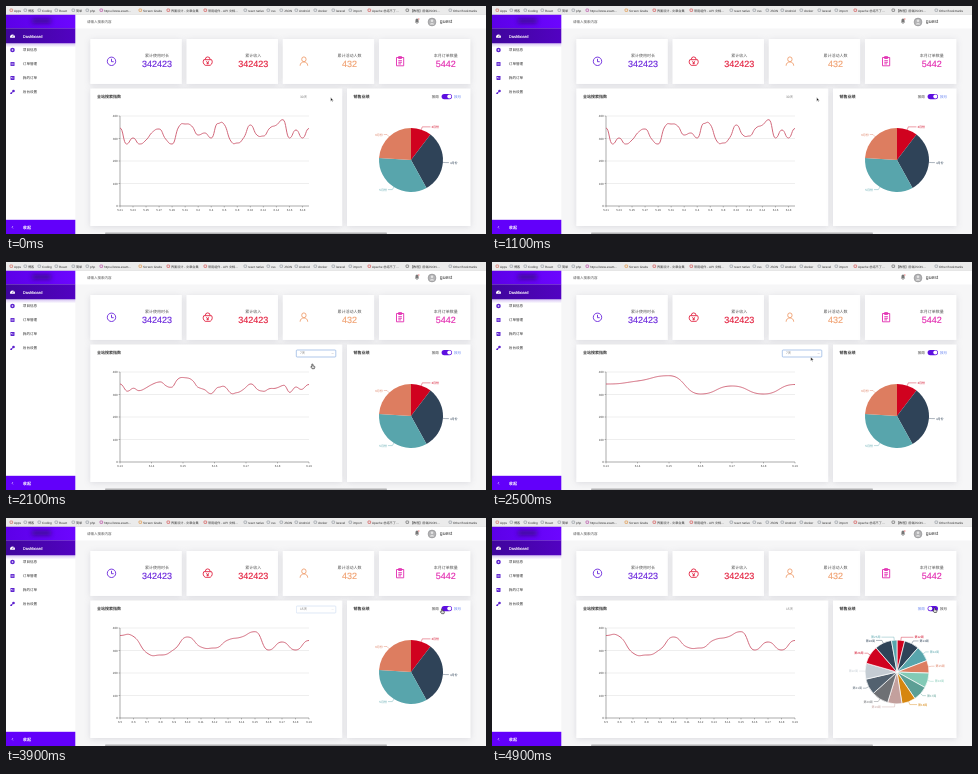
Write an HTML page that moves like this. It is 480 px wide and 228 px high and loops after 5 s.

```html
<!DOCTYPE html>
<html lang="zh">
<head>
<meta charset="utf-8">
<title>Dashboard</title>
<style>
html, body { margin: 0; width: 100%; height: 100%; overflow: hidden; background: #f6f6f7; }
svg { display: block; width: 480px; height: 228px; }
text {
  font-family: "Liberation Sans", "Noto Sans CJK SC", "Noto Sans CJK", sans-serif;
  text-rendering: geometricPrecision;
  white-space: pre;
}
.card { fill: #fff; filter: drop-shadow(0 1px 3px rgba(40, 40, 70, .13)); }
.menu { fill: #fff; stroke: #e2e5ee; stroke-width: .4; filter: drop-shadow(0 1px 1.5px rgba(0, 0, 0, .12)); }
</style>
</head>
<body>
<svg id="stage" viewBox="0 0 480 228" xmlns="http://www.w3.org/2000/svg">
  <defs>
    <linearGradient id="brand"><stop offset="0" stop-color="#5c00e8"/><stop offset="1" stop-color="#6c06ff"/></linearGradient>
    <linearGradient id="active"><stop offset="0" stop-color="#3f069c"/><stop offset="1" stop-color="#5202c2"/></linearGradient>
    <linearGradient id="glow" x2="0" y2="1"><stop offset="0" stop-color="#5a10d0" stop-opacity=".25"/><stop offset="1" stop-color="#5a10d0" stop-opacity="0"/></linearGradient>
    <filter id="soft" x="-.5" y="-1" width="2" height="3"><feGaussianBlur stdDeviation="2"/></filter>
  </defs>
  <g id="base"></g>
  <g id="live"></g>
</svg>
<script>
const LOOP = 5000;
const base = document.getElementById('base');
const live = document.getElementById('live');

// --- small drawing helpers ---
const n = v => +v.toFixed(2);
const rect = (x, y, w, h, fill, extra = '') =>
  `<rect x="${n(x)}" y="${n(y)}" width="${n(w)}" height="${n(h)}" fill="${fill}" ${extra}/>`;
const text = (x, y, s, size, fill, extra = '') =>
  `<text x="${n(x)}" y="${n(y)}" font-size="${size}" fill="${fill}" ${extra}>${s}</text>`;
const line = (d, color, w = .5, extra = '') =>
  `<path d="${d}" fill="none" stroke="${color}" stroke-width="${w}" ${extra}/>`;
const shape = (d, fill, extra = '') => `<path d="${d}" fill="${fill}" ${extra}/>`;
const dot = (x, y, r, fill, extra = '') =>
  `<circle cx="${n(x)}" cy="${n(y)}" r="${r}" fill="${fill}" ${extra}/>`;
const at = (x, y, body) => `<g transform="translate(${n(x)} ${n(y)})">${body}</g>`;
const fade = (opacity, body) => `<g opacity="${n(opacity)}">${body}</g>`;
const MID = 'text-anchor="middle"';
const END = 'text-anchor="end"';
const clamp = v => Math.max(0, Math.min(1, v));
const ease = v => 1 - (1 - clamp(v)) ** 3;
const mix = (a, b, p) => a + (b - a) * p;

// --- static page ---
function bookmarks() {
  const folder = '#8a9099';
  const items = [
    [8, 'Apps', '#d05a4a'], [22, '博客', folder], [36, 'Coding', folder], [53, 'React', folder],
    [70, '简单', folder], [84, 'php', folder], [98, 'https://www.exam…', '#b0389a'],
    [137, 'Screen Grabs', '#e08a30'], [165, '界面设计 - 文章合集', '#d04040'],
    [202, '常用组件 - API 文档…', '#d04040'], [242, 'react native', folder],
    [265, 'css', folder], [278, 'JSON', folder], [293, 'Android', folder],
    [312, 'docker', folder], [330, 'laravel', folder], [347, 'import', folder],
    [366, 'Apache 总结不了…', '#d04040'], [404, '【教程】前端JSON…', '#555'],
    [447, 'Other Bookmarks', folder]
  ];
  return rect(0, 0, 480, 8.4, '#ebebeb') + rect(0, 8, 480, .4, '#cfcfcf') +
    items.map(([x, s, c]) => rect(x - 4, 3, 2.6, 2.4, 'none', `rx=".4" stroke="${c}" stroke-width=".6"`) +
      text(x, 5.5, s, 3.1, '#333')).join('');
}

function sidebar() {
  const purple = '#5d22cf';
  const icons = [
    dot(0, 0, 2.3, purple) + dot(0, 0, .8, '#fff'),
    rect(-2, -2, 4, 4, purple, 'rx=".5"') + line('M-1.2 -.7H1.2M-1.2 .7H1.2', '#fff'),
    rect(-2, -2, 4, 4, purple, 'rx=".4"') + line('M-1 -1V0H1', '#fff', .6),
    line('M-2 2L1 -1', purple, 1) + dot(1, -1, 1.3, purple) + dot(-1.2, 1.2, .9, purple)
  ];
  const labels = ['项目信息', '订单管理', '我的订单', '后台设置'];
  return rect(0, 8.4, 69.3, 219.6, '#fff') +
    rect(0, 8.4, 69.3, 14, 'url(#brand)') +
    rect(26, 12.5, 19, 5, '#340a78', 'filter="url(#soft)" opacity=".75"') +
    rect(0, 22.3, 69.3, 15, 'url(#active)') +
    rect(0, 37.3, 69.3, 4, 'url(#glow)') +
    at(6.5, 30, shape('M-2.4 1.8A2.5 2.5 0 1 1 2.4 1.8Z', '#fff') + line('M0 1L.9 -.8', '#43069f', .6)) +
    text(16.8, 31.5, 'Dashboard', 4, '#fff', 'stroke="#fff" stroke-width=".12"') +
    labels.map((s, i) => at(6.5, 44 + 14 * i, icons[i]) + text(16.8, 45.4 + 14 * i, s, 3.6, '#333')).join('') +
    rect(0, 213.8, 69.3, 14.2, '#6200fa') +
    line('M7 220L6 221.2L7 222.4', '#fff', .5) +
    text(16.8, 222.8, '收起', 4.1, '#fff', 'font-weight="bold"');
}

function header() {
  return rect(69.3, 8.4, 410.7, 14, '#fff') +
    text(81, 16.6, '请输入搜索内容', 3.5, '#555') +
    at(411, 15, shape('M-2.2 1.6L-1.5 .6V-1A1.5 1.5 0 0 1 1.5 -1V.6L2.2 1.6Z', '#777') + dot(0, 2.2, .6, '#777') + dot(1.8, -2, .8, '#e88')) +
    dot(426, 16, 3.9, '#b4b4b6', 'stroke="#8c8c8e" stroke-width=".6"') + dot(426, 14.8, 1.3, '#e4e4e4') +
    shape('M423.6 18.5A2.5 2.2 0 0 1 428.4 18.5Z', '#e4e4e4') +
    text(433.8, 17.4, 'guest', 5.1, '#333');
}

function cards() {
  const data = [
    ['累计使用时长', '342423', '#6a25dc',
      'M-4.2 0A4.2 4.2 0 1 1 4.2 0A4.2 4.2 0 1 1 -4.2 0M0 -2.5V.4H2.2'],
    ['累计收入', '342423', '#e3203f',
      'M-3.9 -1.6H3.9A4 4 0 0 1 2.5 4H-2.5A4 4 0 0 1 -3.9 -1.6M-2.4 -1.8A2.4 2.6 0 0 1 2.4 -1.8M-1.4 0L0 1.2L1.4 0M0 1.2V3M-1.3 1.8H1.3'],
    ['累计活动人数', '432', '#f0a070',
      'M-2.2 -2A2.2 2.4 0 1 1 2.2 -2A2.2 2.4 0 1 1 -2.2 -2M-3.8 4.4C-3.8 -.6 3.8 -.6 3.8 4.4'],
    ['本月订单数量', '5442', '#e22bb0',
      'M-3.6 -3.8H3.6V4.5H-3.6ZM-1.5 -4.7H1.5V-2.8H-1.5ZM-1.8 -.6H1.8M-1.8 1H1.8M-1.8 2.6H1']
  ];
  return data.map(([label, num, c, d], i) => {
    const x = 84.3 + 96.2 * i;
    return rect(x, 33, 91.5, 45, '#fff', 'class="card"') +
      at(x + 21.2, 55.3, line(d, c, .9)) +
      text(x + 66.8, 51.2, label, 4, '#555', MID) +
      text(x + 66.8, 61.2, num, 9, c, MID + ` stroke="${c}" stroke-width=".15"`);
  }).join('');
}

function panels() {
  let s = rect(84.3, 82.5, 252, 137.5, '#fff', 'class="card"') +
    rect(341, 82.5, 123.5, 137.5, '#fff', 'class="card"') +
    text(91, 92.3, '全站搜索指数', 4, '#333', 'font-weight="bold"') +
    text(347.5, 92.3, '销售业绩', 4, '#333', 'font-weight="bold"');
  for (let i = 0; i < 5; i++) {
    const y = 110 + 22.5 * i;
    if (i < 4) s += line(`M114 ${y}H303`, '#ddd', .5);
    s += line(`M112.6 ${y}H114`, '#555', .4) + text(111.8, y + 1, 400 - 100 * i, 3, '#444', END);
  }
  return s + line('M114 110V200H303', '#555', .5) + rect(99, 226.6, 282, 1.4, '#b0b0b2', 'rx=".7"');
}

base.innerHTML = rect(0, 0, 480, 228, '#f6f6f7') + header() + cards() + panels() + sidebar() + bookmarks();

// --- line chart ---
const DAILY = [122, 138, 132, 138, 134, 126, 123, 133, 138, 121, 118, 120, 129, 127, 132,
  117.5, 118.5, 135, 137, 131.5, 119, 129, 130, 122, 119, 113.7, 132, 124, 132, 122.5];
const X0 = 114, SPAN = 189;

function slope(v, i) {
  if (i === 0 || i === v.length - 1) return 0;
  const a = v[i] - v[i - 1], b = v[i + 1] - v[i];
  return a * b <= 0 ? 0 : (a + b) / 2;
}

const bezier = (a, b, c, d, s) => {
  const r = 1 - s;
  return a * r ** 3 + 3 * b * r * r * s + 3 * c * r * s * s + d * s ** 3;
};

// Smooth line whose control points sit half a step from each day.
function curve(days, u) {
  const v = DAILY.slice(-days);
  const i = Math.min(days - 2, Math.floor(u * (days - 1)));
  const s = u * (days - 1) - i;
  const x = X0 + SPAN * (i + bezier(0, .5, .5, 1, s)) / (days - 1);
  const y = bezier(v[i], v[i] + slope(v, i) / 2, v[i + 1] - slope(v, i + 1) / 2, v[i + 1], s);
  return [x, y];
}

function axis(days) {
  const step = days > 15 ? 2 : 1;
  let s = '';
  for (let i = 0; i < days; i += step) {
    const x = X0 + SPAN * i / (days - 1);
    const back = days - 1 - i;
    const date = back < 19 ? '6.' + (19 - back) : '5.' + (50 - back);
    s += line(`M${n(x)} 200V201.4`, '#555', .4) + text(x, 204.6, date, 2.9, '#444', MID);
  }
  return s;
}

function chart(from, to, p) {
  const steps = 232;
  let d = '';
  for (let i = 0; i <= steps; i++) {
    const [xa, ya] = curve(from, i / steps), [xb, yb] = curve(to, i / steps);
    d += (i ? 'L' : 'M') + n(mix(xa, xb, p)) + ' ' + n(mix(ya, yb, p));
  }
  return axis(to) + line(d, '#cf6074', .95, 'stroke-linejoin="round"');
}

// --- pie ---
const COLORS = ['#d0021f', '#2f4358', '#58a5ac', '#dd7d60', '#82cab6', '#5c9f95', '#d6860f',
  '#c3a09d', '#6e7074', '#52616f', '#c4ccd3'];
const MONTHS = [37.5, 151, 273.5];
const WEEKS = [14, 41, 69, 92, 119, 146, 171, 197, 228, 257, 286, 319, 350, 360];
const CX = 405, CY = 154, R = 32;

const polar = (deg, r) => {
  const a = deg * Math.PI / 180;
  return [n(CX + r * Math.sin(a)), n(CY - r * Math.cos(a))];
};

function pieLabel(mid, s, color) {
  const side = mid < 180 ? 1 : -1;
  const [x, y] = polar(mid, 35);
  const reach = 4 + 10 * Math.cos(mid * Math.PI / 180) ** 12;
  return line(`M${polar(mid, R)}L${x} ${y}H${n(x + side * (reach - 1))}`, color, .4) +
    text(x + side * reach, y + 1.1, s, 3, color, side < 0 ? END : '');
}

function pie(p) {
  const late = p >= .5;
  let slices = '', labels = '', a = 0;
  WEEKS.forEach((end, i) => {
    const b = mix(MONTHS[i] ?? 360, end, p);
    if (b - a > .3) {
      const c = COLORS[i % COLORS.length];
      slices += shape(`M${CX} ${CY}L${polar(a, R)}A${R} ${R} 0 0 1 ${polar(b, R)}Z`, c, `stroke="#fff" stroke-width="${n(.7 * p)}"`);
      if (late || i < 4) labels += pieLabel((a + b) / 2, late ? `第${i + 12}周` : `${i + 3}月份`, c);
    }
    a = b;
  });
  return slices + fade(Math.abs(2 * p - 1), labels);
}

function toggle(p) {
  const on = '#5f7df0', off = '#333';
  return text(429.3, 91.9, '按周', 3.5, p > .5 ? on : off, MID) +
    rect(435.6, 88, 10.4, 5.2, '#5d0fe0', 'rx="2.6"') +
    dot(mix(443.3, 438.3, p), 90.6, 2, '#fff') +
    text(451.5, 91.9, '按月', 3.5, p > .5 ? off : on, MID);
}

// --- select box ---
function select(days, focus, open) {
  const border = rect(290.3, 88, 39.5, 7, '#fff', 'rx=".8" stroke="#7ba3dc" stroke-width=".6"') +
    line(open ? 'M325.6 92L326.6 91L327.6 92' : 'M325.6 91L326.6 92L327.6 91', '#aab', .4);
  return fade(focus, border) + text(294, 92.4, days + '天', 3.3, '#777');
}

function menu(days, hover) {
  return rect(290.3, 98.6, 40, 29, '#fff', 'class="menu" rx=".8"') +
    shape('M297 98.7L298.6 97L300.2 98.7Z', '#fff', 'stroke="#e2e5ee" stroke-width=".3"') +
    [7, 15, 30].map((d, i) => {
      const y = 103.8 + 8.6 * i;
      return (d === hover ? rect(290.6, y - 4.1, 39.4, 8.3, '#f1f4fa') : '') +
        text(295.3, y + 1.2, d + '天', 3.4, d === days ? '#3f86dc' : '#555', d === days ? 'font-weight="bold"' : '');
    }).join('');
}

// --- pointer: time, x, y ---
const PATH = [
  [0, 324.6, 91.3], [1100, 324.6, 91.3], [1300, 322, 92], [1700, 320.6, 101], [1900, 304, 103],
  [2050, 304, 103], [2450, 319, 95.3], [2900, 316, 91.5], [3150, 315, 92], [3600, 313.5, 111.5],
  [3700, 313.5, 111.5], [3900, 435.5, 91], [4200, 437, 90.6], [4450, 441, 90.4], [4900, 442, 89.8]
];

function pointer(t) {
  let i = 0;
  while (i < PATH.length - 2 && t >= PATH[i + 1][0]) i++;
  const [t0, x0, y0] = PATH[i], [t1, x1, y1] = PATH[i + 1];
  const p = clamp((t - t0) / (t1 - t0));
  const hand = (t >= 1300 && t < 2150) || (t >= 3000 && t < 3750) || t >= 3850;
  const glyph = hand
    ? 'M0 0Q.7 -.4 1 .4V1.8L2.6 2.2Q3.1 2.5 2.8 3.8L2.4 4.7H.2L-1.2 2.9Q-1.1 2.1 -.1 2.6Z'
    : 'M0 0V4.2L1 3.3L1.7 4.8L2.4 4.5L1.7 3.1H3Z';
  const fill = hand ? '#ddd' : '#111', edge = hand ? '#222' : '#fff';
  const ring = t >= 3550 && t < 3700
    ? dot(.2, .6, 7.6, 'rgba(255,255,255,.4)', 'stroke="#222" stroke-width=".9"') : '';
  return at(mix(x0, x1, p), mix(y0, y1, p), ring + shape(glyph, fill, `stroke="${edge}" stroke-width=".6"`));
}

// --- timeline ---
function draw(t) {
  const days = t < 2050 ? 30 : t < 3680 ? 7 : 15;
  const [from, start] = days === 30 ? [30, 0] : days === 7 ? [30, 2050] : [7, 3680];
  const open = (t >= 1200 && t < 2050) || (t >= 3100 && t < 3680);
  const focus = clamp((t - 1150) / 80) - clamp((t - 3780) / 200);
  const hover = t >= 1850 && t < 2050 ? 7 : t >= 3500 && t < 3680 ? 15 : 0;
  live.innerHTML =
    chart(from, days, ease((t - start) / 220)) +
    select(days, focus, open) +
    (open ? menu(days, hover) : '') +
    pie(ease((t - 4450) / 350)) +
    toggle(ease((t - 4400) / 100)) +
    pointer(t);
}

const begin = performance.now();
function tick() {
  draw((performance.now() - begin) % LOOP);
  requestAnimationFrame(tick);
}
tick();
</script>
</body>
</html>
```
